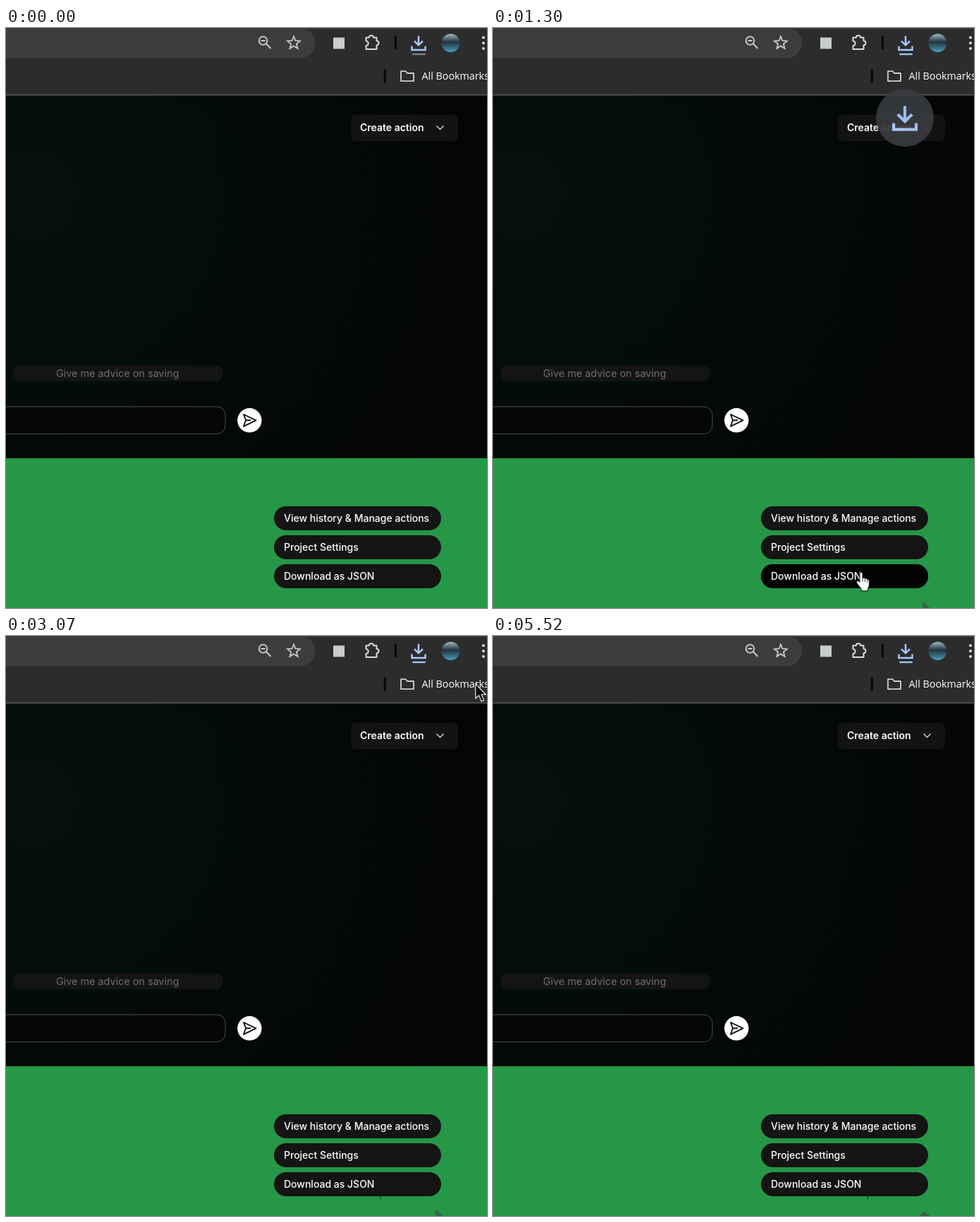
Animation, 682 px wide and 821 px high, one loop 6.11 s. Source, as an HTML page:

```html
<!DOCTYPE html>
<html lang="en">
<head>
<meta charset="utf-8">
<title>Download as JSON</title>
<style>
  html, body { margin: 0; width: 100%; height: 100%; overflow: hidden; background: #050605; }
  svg { display: block; width: 682px; height: 821px; overflow: hidden; }
  .ui { font: 500 14px Inter, "Open Sans", sans-serif; fill: #fff; }
  .sys { font: 14.3px "Open Sans", "Noto Sans", sans-serif; fill: #fff; }
  .line { fill: none; stroke: #c7c7c7; stroke-width: 2; }
</style>
</head>
<body>
<svg viewBox="0 0 682 821">
  <defs>
    <radialGradient id="glow" gradientUnits="userSpaceOnUse" cx="40" cy="235" r="690">
      <stop offset="0" stop-color="#04110a"/>
      <stop offset=".5" stop-color="#040b07"/>
      <stop offset="1" stop-color="#040504"/>
    </radialGradient>
    <linearGradient id="avatar" x2="0" y2="1">
      <stop offset="0" stop-color="#9fb8c0"/>
      <stop offset=".45" stop-color="#20343c"/>
      <stop offset="1" stop-color="#4a9cc0"/>
    </linearGradient>
    <path id="arrowDown" d="M0-10V2.5M-6-3L0 3L6-3M-9.5 4.5V9.8H9.5V4.5" fill="none" stroke="#a8c7fa" stroke-width="2.5"/>
  </defs>

  <!-- page -->
  <rect y="95" width="682" height="515" fill="url(#glow)"/>
  <rect x="489" y="123" width="152" height="37" rx="8" fill="#131313"/>
  <text class="ui" x="502" y="146" style="font-weight:600">Create action</text>
  <path class="line" d="M610.5 138.5L615.5 143.5L620.5 138.5" style="stroke:#eee;stroke-width:1.2"/>
  <rect x="10" y="478" width="298" height="22" rx="11" fill="#141414"/>
  <text class="ui" x="71" y="493.5" style="font-size:14.4px;font-weight:400;fill:#6e6e6e">Give me advice on saving</text>
  <rect x="-30" y="536" width="341" height="38.5" rx="12" fill="#040605" stroke="#4d4f4e"/>
  <circle cx="345.3" cy="555.3" r="17.2" fill="#fff"/>
  <path d="M337 547L354.5 555.3L337 563.8L340 555.3ZM340 555.3H347" fill="none" stroke="#111" stroke-width="1.9" stroke-linejoin="round"/>
  <rect y="609" width="682" height="212" fill="#269647"/>
  <path id="speck" d="M530 793h2v4h-2z" fill="#17532a"/>
  <g id="menu"></g>
  <path id="corner" fill="#35674a"/>

  <!-- browser bar -->
  <rect width="682" height="95" fill="#2c2c2c"/>
  <rect width="682" height="1" fill="#474747"/>
  <rect x="-40" width="478" height="42.5" rx="21" fill="#3c3c3c"/>
  <rect y="94" width="682" height="1.5" fill="#5a5a5a"/>
  <g class="line">
    <circle cx="364.5" cy="18" r="5.8"/>
    <path d="M368.8 22.3L375.5 29M361.5 18H367.5"/>
    <path id="star" stroke-width="1.8"/>
    <path d="M510.5 13.5H515a3 3 0 0 1 6 0H525.5V18.3a3 3 0 0 1 0 6V30H510.5V25a3.2 3.2 0 0 0 0-6.4Z" stroke="#dcdcdc" stroke-linejoin="round"/>
    <path d="M560 61.2H566.5L569 64H578V75.2H560Z" stroke="#d0d0d0" stroke-width="1.8" stroke-linejoin="round"/>
  </g>
  <rect x="464" y="13.5" width="16" height="16" fill="#c8cccb"/>
  <rect x="550.8" y="10.5" width="3" height="20" rx="1.5" fill="#060606"/>
  <rect x="535.8" y="58" width="3" height="20" rx="1.5" fill="#060606"/>
  <text class="sys" x="589.5" y="73">All Bookmarks</text>
  <circle id="ring" cx="584.5" cy="21" r="21.5" fill="#3d3e40"/>
  <use href="#arrowDown" x="585" y="21.3"/>
  <rect id="bar" x="576" y="36" width="19" height="2.2" rx="1"/>
  <circle cx="630.5" cy="21.3" r="13" fill="url(#avatar)"/>
  <path d="M677 13.6v0M677 21.3v0M677 29v0" stroke="#dcdcdc" stroke-width="4" stroke-linecap="round"/>

  <g id="badge">
    <circle r="41" fill="#383a3e"/>
    <use href="#arrowDown" transform="scale(1.68)"/>
  </g>

  <g id="tip">
    <rect x="588.5" y="38.5" width="110" height="32" fill="#202020"/>
    <path d="M588.5 71V38.5H682" fill="none" stroke="#d8d8d8"/>
    <text class="sys" x="598.5" y="60">Downloads</text>
  </g>

  <g id="cursor">
    <path id="pointer" d="M.5.5V21L5.2 16.8L8.8 25.2L12.3 23.7L8.8 15.5H15Z" fill="#080808" stroke="#fff" stroke-width="1.1"/>
    <g id="hand">
      <path d="M-2 2Q-2 0 0 0Q2 0 2 2V8Q4.4 7 5.4 8.7Q7.6 7.8 8.5 9.7Q11.3 9.2 11.3 12.2V18Q11.3 20.8 9.5 23V26.3H0V23Q-3 20-6 15.5Q-7.4 13-5.4 12.2Q-3.8 11.7-2 14Z" fill="#fff" stroke="#111"/>
      <path d="M2 8V13M5.4 9V13.5M8.5 10V14" fill="none" stroke="#222" stroke-width=".9"/>
    </g>
  </g>
</svg>
<script>
const LOOP = 6110, STEP = 70;
const $ = id => document.getElementById(id);
const show = (id, on) => { $(id).style.display = on ? "" : "none"; };
const moveTo = (id, x, y) => $(id).setAttribute("transform", `translate(${x} ${y})`);
const mix = (a, b, p) => a + (b - a) * p;
const easeOut = p => 1 - (1 - p) ** 2;
const easeInOut = p => p * p * (3 - 2 * p);

function progress(t, a, b) {
  if (t >= b) return 1;
  return Math.max(0, Math.floor((t - a) / STEP + .01) * STEP / (b - a));
}

const moves = [
  { start: 330, end: 610, from: [609, 811], to: [522, 769.5], ease: easeOut },
  { start: 2580, end: 3140, from: [558, 524], to: [667, 60], ease: easeOut },
  { start: 3140, end: 3550, from: [667, 60], to: [577, 21], ease: easeInOut },
  { start: 4960, end: 5520, from: [577, 20], to: [612, 830], ease: easeInOut }
];

function cursorAt(t) {
  const m = moves.findLast(m => t >= m.start) || moves[0];
  const p = m.ease(progress(t, m.start, m.end));
  return m.from.map((v, i) => mix(v, m.to[i], p));
}

const pill = (y, attrs) => `<rect x="380" y="${y}" width="237" height="34" rx="17" ${attrs}/>`;
const labels = ["View history &amp; Manage actions", "Project Settings", "Download as JSON"];
$("menu").innerHTML = labels.map((label, i) => {
  const y = 677 + i * 41;
  const hover = i === 2 ? pill(y, 'id="hover" fill="#020202"') : "";
  return pill(y, 'fill="#141414"') + hover + `<text class="ui" x="394" y="${y + 22}">${label}</text>`;
}).join("");

$("star").setAttribute("d", "M" + Array.from({ length: 10 }, (_, i) => {
  const r = i % 2 ? 4.1 : 9.4, a = Math.PI * (i / 5 - .5);
  return `${408 + r * Math.cos(a)} ${21.3 + r * Math.sin(a)}`;
}).join("L") + "Z");

function draw(t) {
  const [x, y] = cursorAt(t);
  const onButton = x > 380 && x < 617 && y > 759 && y < 793;
  const press = t < 2580 ? progress(t, 940, 1010) : 0;
  show("cursor", t >= 330);
  moveTo("cursor", x, y + press);
  show("hand", onButton);
  show("pointer", !onButton);

  const held = progress(t, 400, 610) - progress(t, 2580, 2790);
  $("hover").style.opacity = Math.max(held, onButton ? .8 : 0);
  show("ring", t >= 3450 && t < 5100);
  show("tip", t >= 4080 && t < 5030);
  $("bar").setAttribute("fill", t < 1080 ? "#858585" : "#a8c7fa");

  // The badge rises towards the toolbar while fading in and out.
  const rise = progress(t, 1010, 1720);
  show("badge", rise > 0 && rise < 1);
  $("badge").style.opacity = .94 * Math.min(1, 1.1 * Math.sin(Math.PI * rise));
  moveTo("badge", 584, mix(200, 85, easeOut(rise)));

  // Smudges the pointer leaves behind.
  show("speck", t >= 2580);
  show("corner", t >= 400);
  $("corner").setAttribute("d", t >= 5520 ? "M604 821L612 814L620 821Z" : "M609 811L619.5 821H609Z");
}

const start = performance.now();
function tick() {
  draw((performance.now() - start) % LOOP);
  requestAnimationFrame(tick);
}
tick();
</script>
</body>
</html>
```
